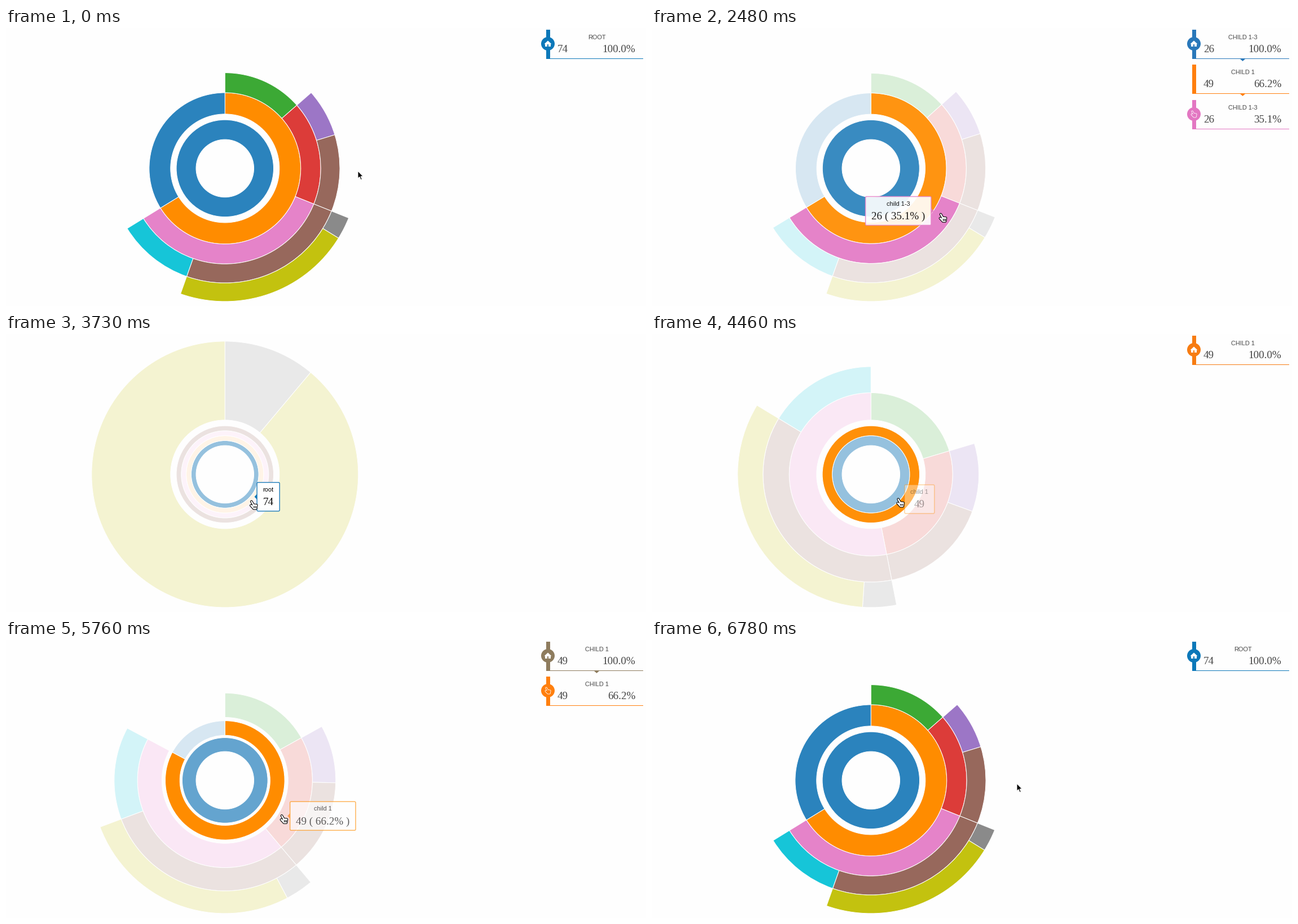
Recreate the animation shown at these times as a matplotlib script. Size 1135 px wide and 494 px high, loop 7.88 s.

```python
import numpy as np
import matplotlib.pyplot as plt
from matplotlib.animation import FuncAnimation
from matplotlib.colors import to_rgb
from matplotlib.patches import Circle, FancyBboxPatch, Polygon, Rectangle, Wedge

W, H, DPI = 1135, 494, 100
PX = 72 / DPI
LOOP, TICK, REFRESH = 7880, 20, 120
CX, CY = 388.3, 249.4
HOLE, HUB, RIM, OUTER = 51.25, 86.25, 96.5, 236.5
LEVELS, BEND = 5, 0.87
LEAD, ZOOM_MS, FADE_MS, TIP_OUT_MS, TIP_LAG = 40, 300, 150, 450, 220
DIM = 0.19
SANS, SERIF = "Liberation Sans", "Liberation Serif"

# ring colour, accent colour
BLUE = "#2b83bd", "#0c78b9"
ORANGE = "#ff8c00", "#ff7f0e"
GREEN = "#3ca935", "#2ca02c"
RED = "#dc3c39", "#dc2020"
PURPLE = "#9c76c6", "#9467bd"
BROWN = "#97685c", "#8c564b"
PINK = "#e583c9", "#e377c2"
GRAY = "#8a8a8a", "#7f7f7f"
OLIVE = "#c3c20f", "#bcbd22"
CYAN = "#16c5d8", "#17becf"


class Node:
    def __init__(self, name, size, colors, *children):
        self.name, self.size, self.children = name, size, children
        self.ring, self.accent = colors

    def place(self, start=0, parent=None):
        self.x0, self.x1 = start, start + self.size
        self.path = (parent.path if parent else []) + [self]
        self.depth = len(self.path) - 1
        nodes = [self]
        for child in self.children:
            nodes += child.place(start, self)
            start += child.size
        return nodes


leaf = Node("child 1-3-1", 8, BROWN)
inner = Node("child 1-3-1", 18, BROWN,
             Node("child 1-3-1-1", 2, GRAY), Node("child 1-3-1-2", 16, OLIVE))
second = Node("child 1-2", 13, RED, Node("child 1-2-1", 5, PURPLE), leaf)
third = Node("child 1-3", 26, PINK, inner, Node("child 1-3-2", 8, CYAN))
first = Node("child 1", 49, ORANGE, Node("child 1-1", 10, GREEN), second, third)
root = Node("root", 74, BLUE, first, Node("child 2", 25, BLUE))
NODES = root.place()

# time, hovered node, zoomed node, pointer position
SCRIPT = [
    (0, None, root, (624, 254)),
    (680, None, root, (624, 254)),
    (690, leaf, root, (592, 238)),
    (1440, inner, root, (535, 308)),
    (1810, third, root, (509, 329)),
    (2480, third, third, (509, 329)),
    (2780, inner, third, (509, 329)),
    (3290, inner, inner, (506, 327)),
    (3470, root, inner, (431, 293)),
    (3840, first, inner, (433, 297)),
    (4170, first, first, (434, 298)),
    (4840, root, root, (433, 280)),
    (5170, root, root, (487, 314)),
    (5290, first, root, (489, 316)),
    (5610, first, first, (490, 317)),
    (5910, second, first, (480, 300)),
    (6050, None, first, (425, 264)),
    (6170, None, root, (400, 252)),
    (6430, None, root, (598, 256)),
    (6780, None, root, (647, 255)),
]
TIMES, HOVERED, ZOOMED, POINTS = zip(*SCRIPT)


def changes(values):
    """Moments at which a column of the script takes a new value."""
    events = [(-1000, values[0])]
    for time, value in zip(TIMES, values):
        if value is not events[-1][1]:
            events.append((time - LEAD, value))
    return events


HOVER, FOCUS = changes(HOVERED), changes(ZOOMED)

HAND = [(3, 2), (6.5, 8), (12, 8.5), (11, 14.5), (7, 14.5), (2, 9), (6, 11)]
ARROW = [(0, 0), (0, 13.5), (3.1, 10.6), (5.2, 15.8), (7.4, 14.8), (5.3, 9.8),
         (9.5, 9.8)]

fig = plt.figure(figsize=(W / DPI, H / DPI), dpi=DPI, facecolor="#fefefe")
ax = fig.add_axes([0, 0, 1, 1])
ax.set(xlim=(0, W), ylim=(H, 0))
ax.axis("off")
artists = []
shown = None


def mix(a, b, t):
    return a + (b - a) * t


def blend(color_a, color_b, t):
    return tuple(mix(np.array(to_rgb(color_a)), np.array(to_rgb(color_b)), t))


def ease(t):
    return 4 * t ** 3 if t < .5 else 1 - 4 * (1 - t) ** 3


def pointer(t):
    return [np.interp(t, TIMES, values) for values in zip(*POINTS)]


def current(events, t, duration=1):
    """Previous value, present value, progress and start of the latest event."""
    i = max(i for i, event in enumerate(events) if event[0] <= t)
    start, value = events[i]
    return events[max(i - 1, 0)][1], value, min((t - start) / duration, 1), start


def add(patch):
    artists.append(ax.add_patch(patch))


def box(x, y, w, h, color, **style):
    add(Rectangle((x, y), w, h, fc=color, lw=0, **style))


def shape(points, x, y, scale=1, **style):
    add(Polygon(np.array(points) * scale + (x, y), **style))


def write(x, y, text, size, font, color="#444444", ha="center", **style):
    label = ax.text(x, y, text, fontsize=size * PX, family=font, color=color,
                    ha=ha, va="baseline", **style)
    artists.append(label)
    return label


def draw_hand(x, y, scale, line, fill):
    for color, width in ((line, 4.6), (fill, 2.4)):
        shape(HAND, x, y, scale, closed=False, fc=fill, ec=color, zorder=8,
              lw=width * scale * PX, capstyle="round", joinstyle="round")


def radii(depth, focus):
    rings = np.array([depth, depth + 1])
    if depth <= focus.depth:
        return HOLE + (HUB - HOLE) * rings / (focus.depth + 1)
    start = ((focus.depth + 1) / LEVELS) ** BEND
    return RIM + (OUTER - RIM) * ((rings / LEVELS) ** BEND - start) / (1 - start)


def strength(node, focus):
    return .5 if node in focus.path[:-1] else 1


def lit(node, hover):
    return 1 if hover is None or node in hover.path else DIM


def draw_chart(t):
    old, new, p, _ = current(FOCUS, t, ZOOM_MS)
    was, now, fade, _ = current(HOVER, t, FADE_MS)
    e = ease(p)
    lo, hi = mix(old.x0, new.x0, e), mix(old.x1, new.x1, e)
    for node in NODES:
        a, b = np.clip([(x - lo) / (hi - lo) for x in (node.x0, node.x1)], 0, 1) * 360
        if b - a < .05:
            continue
        r_in, r_out = mix(radii(node.depth, old), radii(node.depth, new), e)
        opacity = (mix(strength(node, old), strength(node, new), p)
                   * mix(lit(node, was), lit(node, now), fade))
        add(Wedge((CX, CY), r_out, a - 90, b - 90, width=r_out - r_in,
                  fc=blend("white", node.ring, opacity), ec="white", lw=PX))


def percent(node, whole):
    return f"{100 * node.size / whole.size:.1f}%"


def draw_crumb(row, node, share, color, is_last):
    y = round(3 + 62.4 * row)
    box(958, y, 7, 52, color)
    box(958, y + 51, 172, 1, color)
    if not is_last:
        shape([(-5, 0), (5, 0), (0, 4.5)], 1047.5, y + 51.5, fc=color, lw=0)
    if row == 0 or is_last:
        add(Circle((961, y + 25), 12, fc=color, lw=0))
    if row == 0:
        shape([(-6.5, .5), (0, -5.5), (6.5, .5)], 961, y + 25, fc="white", lw=0)
        box(956.4, y + 25, 3.3, 5, "white")
        box(962.3, y + 25, 3.3, 5, "white")
        box(959, y + 24, 4, 2.5, "white")
    elif is_last:
        draw_hand(955.8, y + 18.8, .75, "white", color)
    write(1047.5, y + 16.5, node.name.upper(), 11, SANS)
    write(978, y + 40, str(node.size), 19.2, SERIF, ha="left")
    write(1116, y + 40, share, 19.2, SERIF, ha="right")


def draw_trail(t):
    old, focus, p, _ = current(FOCUS, t, ZOOM_MS)
    _, hover, _, since = current(HOVER, t)
    base = current(FOCUS, since)[1]
    tail = []
    if hover and base in hover.path:
        tail = hover.path[base.depth + 1:]
    elif hover and base is focus:
        return
    draw_crumb(0, focus, "100.0%", blend(old.accent, focus.accent, p), not tail)
    for row, node in enumerate(tail, 1):
        draw_crumb(row, node, percent(node, base), node.accent, node is tail[-1])


def draw_tooltip(t):
    _, node, alpha, since = current(HOVER, t, FADE_MS)
    _, base, _, _ = current(FOCUS, since)
    _, _, fade_out, clicked = current(FOCUS, t, TIP_OUT_MS)
    if clicked >= since:
        alpha = 1 - fade_out
    if node is None or alpha <= 0:
        return
    value = str(node.size)
    if base in node.path:
        value += f" ( {percent(node, base)} )"
    style = dict(color="black", alpha=alpha, zorder=6)
    texts = [write(0, 0, node.name, 11, SANS, **style),
             write(0, 0, value, 19.2, SERIF, **style)]
    renderer = fig.canvas.get_renderer()
    half = max(s.get_window_extent(renderer).width for s in texts) / 2 + 10.5

    # The box trails the pointer and stays towards the chart's inner side.
    x, y = pointer(t - TIP_LAG)
    side = -1 if x > 500 else 1
    edge = x + 14 * side
    x, y = edge + side * half, y - 4
    for label, dy in zip(texts, (-9.5, 15)):
        label.set_position((x, y + dy))
    shape([(0, -5), (-side * 4.5, 0), (0, 5)], edge, y, fc=node.accent, lw=0,
          alpha=alpha, zorder=5)
    add(FancyBboxPatch((x - half, y - 25.5), 2 * half, 51,
                       boxstyle="round,pad=0,rounding_size=2", fc="white",
                       ec=node.ring, lw=1.5 * PX, alpha=alpha, zorder=5))


def draw_pointer(t):
    x, y = pointer(t)
    if np.hypot(x - CX, y - CY) > 206:
        shape(ARROW, x, y, fc="black", ec="white", lw=1.1 * PX, zorder=8)
        return
    draw_hand(x, y, 1, "black", "white")
    for dx in (6.8, 8.8, 10.8):
        box(x + dx, y + 10, .8, 3.8, "black", zorder=9)


def update(frame):
    global shown
    now = frame * TICK + TICK / 2
    start = max(time for time in TIMES if time <= now)
    t = start + (now - start) // REFRESH * REFRESH
    if t != shown:
        shown = t
        while artists:
            artists.pop().remove()
        draw_chart(t)
        draw_trail(t)
        draw_tooltip(t)
        draw_pointer(t)
    return artists


def init():
    global shown
    shown = None
    return update(0)


anim = FuncAnimation(fig, update, frames=LOOP // TICK, init_func=init,
                     interval=TICK, repeat=True, repeat_delay=0, blit=False)
plt.show()
```
